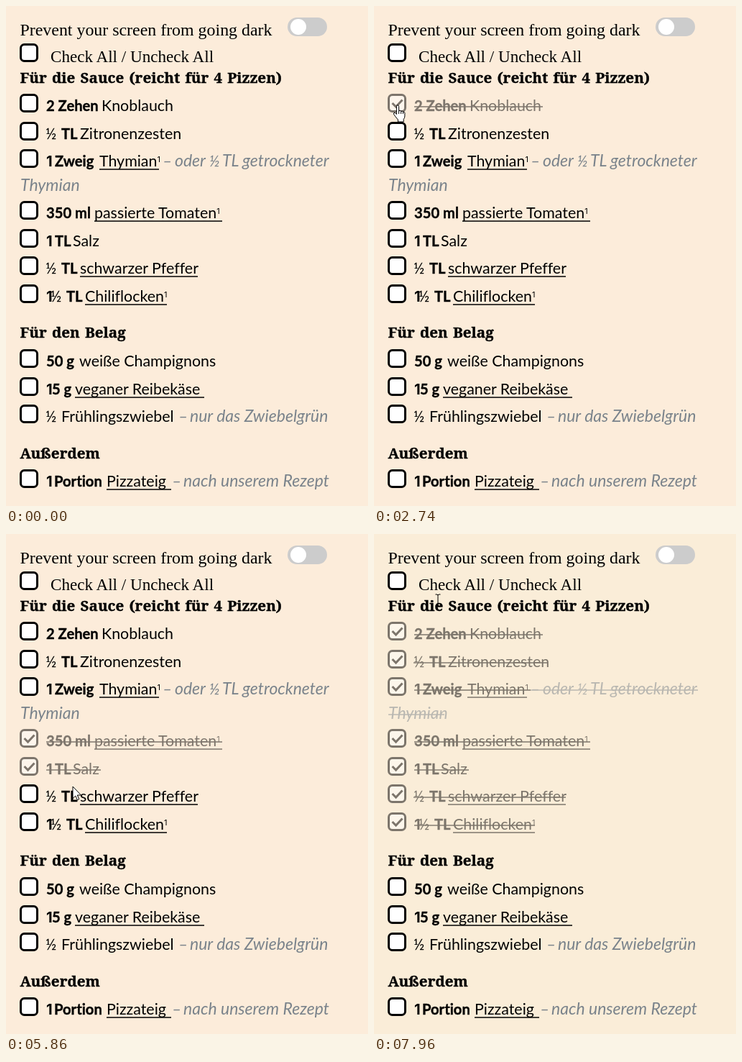
These frames come from a looping animation (504x695 px, 7990 ms). An HTML page:

```html
<!DOCTYPE html>
<html lang="de">
<head>
<meta charset="utf-8">
<title>Zutatenliste</title>
<style>
  html, body { margin: 0; width: 100%; height: 100%; overflow: hidden; background: #fcecda; }
  svg { display: block; width: 504px; height: 695px; }
  text { white-space: pre; font: 21.4px Lato, sans-serif; font-variant-ligatures: none; fill: #000; }
  .b { font-weight: 700; font-size: 20.2px; }
  .one { font: 700 20px Inter, sans-serif; }
  .i { font-style: italic; font-size: 23px; fill: #7a838b; }
  .half { font-size: 21px; }
  .sup { font: 11px Inter, sans-serif; }
  .h { font: 700 20.6px "Noto Serif", serif; word-spacing: 1.8px; }
  .b, .h { stroke: #000; stroke-width: .35; }
  .s { font: 23.9px "Liberation Serif", serif; }
  .s.label { font-size: 23.1px; }
  .line { stroke: #000; stroke-width: 1.4; }
  .line.i { stroke: #7a838b; }
  .box { fill: #fff; stroke: #000; stroke-width: 3; }
  .tick { fill: none; stroke: #000; stroke-width: 3; }
  #cursor path { fill: #fff; stroke: #000; stroke-linejoin: round; }
  #cursor .bare { fill: none; }
</style>
</head>
<body>
<svg viewBox="0 0 504 695">
  <rect x="392" y="16" width="55" height="26" rx="13" fill="#ccc"/>
  <circle cx="407" cy="29" r="11" fill="#fff"/>
  <g id="list"></g>
  <g id="cursor">
    <g id="hand" transform="translate(-6.6 -1)">
      <path d="M5 13.5V2.5a1.6 1.6 0 0 1 3.2 0V8.5q2.8-1 3 .8 2.6-.8 2.8.9 2.4-.5 2.5 1.6V16q0 2.5-1.7 4.5V24H7V21Q3 16.5 1 13.2q-.4-2 1.6-1.8Q4 12 5 13.5Z"/>
      <path class="bare" d="M8.2 8.5V13M11.2 9.3V13M14 10.2V13"/>
    </g>
    <path id="arrow" d="M0 0V16.5L3.8 13 6.3 18.7 8.8 17.6 6.3 12H11.5Z"/>
    <path id="beam" class="bare" d="M-3.5-8H-1L0-7 1-8H3.5M0-7V7M-3.5 8H-1L0 7 1 8H3.5"/>
  </g>
</svg>
<script>
const LOOP = 7990, FADE = 120;
const NS = 'http://www.w3.org/2000/svg';
const $ = id => document.getElementById(id);
const list = $('list');

function add(parent, tag, attrs, text) {
  const el = document.createElementNS(NS, tag);
  for (const key in attrs) el.setAttribute(key, attrs[key]);
  if (text) el.textContent = text;
  return parent.appendChild(el);
}

const line = (parent, x1, x2, y, cls) =>
  add(parent, 'line', { x1, x2, y1: y, y2: y, class: 'line ' + cls });

function write(parent, x, y, cls, text) {
  const raised = text.endsWith('¹');
  const el = add(parent, 'text', { x, y, class: cls }, raised ? text.slice(0, -1) : text);
  if (raised) add(el, 'tspan', { class: 'sup', dy: -6 }, '1');
}

write(list, 19.5, 41, 's', 'Prevent your screen from going dark');
write(list, 62, 78, 's label', 'Check All / Uncheck All');
write(list, 19.5, 107, 'h', 'Für die Sauce (reicht für 4 Pizzen)');
write(list, 19.5, 461, 'h', 'Für den Belag');
write(list, 19.5, 629, 'h', 'Außerdem');

// Each row: box centre, end of text, pieces as [x, class, text, underline end]
const ALL = [1320, 1910];
const rows = [
  { y: 65, end: 0, parts: [], on: [ALL] },
  { y: 135, end: 235, parts: [[56, 'b', '2 Zehen'], [133, 'r', 'Knoblauch']],
    on: [ALL, [2610, 3140], [7600, 9000]] },
  { y: 174, end: 241, parts: [[55, 'half', '½'], [77, 'b', 'TL'], [103, 'r', 'Zitronenzesten']],
    on: [ALL, [7410, 9000]] },
  { y: 212, end: 451, parts: [[56, 'one', '1'], [68, 'b', 'Zweig'], [130, 'r', 'Thymian¹', 213],
      [218, 'i', '–'], [235, 'i', 'oder'], [283, 'i half', '½'], [301, 'i', 'TL'], [329, 'i', 'getrockneter']],
    more: 'Thymian', on: [ALL, [7200, 9000]] },
  { y: 284, end: 301, parts: [[56, 'b', '350 ml'], [123, 'r', 'passierte Tomaten¹', 301]],
    on: [ALL, [5430, 9000]] },
  { y: 323, end: 132, parts: [[56, 'one', '1'], [68, 'b', 'TL'], [93, 'r', 'Salz']],
    on: [ALL, [5680, 9000]] },
  { y: 361, end: 267, parts: [[55, 'half', '½'], [77, 'b', 'TL'], [103, 'r', 'schwarzer Pfeffer', 267]],
    on: [ALL, [6280, 9000]] },
  { y: 400, end: 224, parts: [[56, 'one', '1'], [62, 'half', '½'], [84, 'b', 'TL'], [110, 'r', 'Chiliflocken¹', 224]],
    on: [ALL, [6540, 9000]] },
  { y: 490, end: 296, parts: [[56, 'b', '50 g'], [102, 'r', 'weiße Champignons']], on: [ALL] },
  { y: 529, end: 276, parts: [[56, 'one', '1'], [64, 'b', '5 g'], [96, 'r', 'veganer Reibekäse', 276]],
    on: [ALL] },
  { y: 567, end: 449, parts: [[55, 'half', '½'], [77, 'r', 'Frühlingszwiebel'], [240, 'i', '–'],
      [256, 'i', 'nur das Zwiebelgrün']], on: [ALL] },
  { y: 657, end: 447, parts: [[56, 'one', '1'], [67, 'b', 'Portion'], [140, 'r', 'Pizzateig', 230],
      [231, 'i', '–'], [247, 'i', 'nach unserem Rezept']], on: [ALL] }
];

for (const row of rows) {
  const { y, end, parts } = row, base = y + 11;
  const group = row.group = add(list, 'g', {});
  add(group, 'rect', { x: 20.5, y: y - 11.5, width: 23, height: 23, rx: 5, class: 'box' });
  for (const [x, cls, text, under] of parts) {
    write(group, x, base, cls, text);
    if (under) line(group, x, under, base + 4, '');
  }
  const done = row.done = add(group, 'g', {});
  add(done, 'path', { d: `M25.5 ${y}l5 5 9-9.5`, class: 'tick' });
  parts.forEach(([x, cls], n) => {
    const next = parts[n + 1];
    line(done, x, next ? next[0] : end, base - 6, cls.startsWith('i') ? 'i' : '');
  });
  if (row.more) {
    write(group, 20, base + 34, 'i', row.more);
    line(done, 20, 98, base + 28, 'i');
  }
}

// Cursor path: time, x, y, shape used from that time on
const path = [
  [770, 196, 168, 'arrow'], [930, 120, 112, 'beam'], [1040, 52, 78, 'hand'], [1170, 28, 63, 'hand'],
  [2060, 28, 63, 'hand'], [2220, 31, 98, 'arrow'], [2300, 33, 124, 'hand'], [2400, 33, 138, 'hand'],
  [3260, 33, 138, 'hand'], [3340, 48, 146, 'beam'], [3600, 86, 178, 'beam'],
  [3770, 86, 178, 'arrow'], [4100, 190, 240, 'arrow'], [4560, 250, 310, 'arrow'],
  [4620, 250, 310, 'arrow'], [5040, 143, 339, 'arrow'], [5200, 70, 312, 'hand'], [5380, 33, 286, 'hand'],
  [5480, 33, 286, 'hand'], [5640, 33, 325, 'hand'], [5740, 33, 325, 'arrow'], [5860, 93, 351, 'arrow'],
  [5890, 93, 351, 'arrow'], [6060, 52, 358, 'hand'], [6210, 33, 363, 'hand'],
  [6340, 33, 363, 'hand'], [6500, 33, 402, 'hand'], [6640, 33, 402, 'arrow'],
  [6780, 66, 338, 'arrow'], [6920, 80, 270, 'beam'], [7020, 75, 240, 'beam'],
  [7050, 75, 240, 'hand'], [7160, 33, 215, 'hand'], [7250, 33, 215, 'hand'], [7370, 33, 177, 'hand'],
  [7450, 33, 177, 'hand'], [7560, 33, 138, 'hand'], [7640, 33, 138, 'arrow'], [7780, 87, 94, 'beam'],
  [7959, 87, 94, 'beam'], [7960, 89, 92, 'beam']
];
const tints = [[0, '#fcecda'], [4620, '#feeddb'], [5420, '#fcecda'], [7400, '#faedd8']];

const ramp = (t, from) => Math.min(1, Math.max(0, (t - from) / FADE));
const shapes = ['hand', 'arrow', 'beam'];

function drawCursor(t) {
  const n = path.findLastIndex(p => p[0] <= t);
  $('cursor').style.display = n < 0 ? 'none' : '';
  if (n < 0) return;
  const [t0, x0, y0, shape] = path[n];
  const [t1, x1, y1] = path[n + 1] || [t0 + 1, x0, y0];
  const k = Math.min(1, (t - t0) / (t1 - t0));
  const x = Math.round(x0 + (x1 - x0) * k), y = Math.round(y0 + (y1 - y0) * k);
  $('cursor').setAttribute('transform', `translate(${x} ${y})`);
  for (const id of shapes) $(id).style.display = id === shape ? '' : 'none';
}

function draw(t) {
  for (const { on, group, done } of rows) {
    const k = on.reduce((sum, [start, stop]) => sum + ramp(t, start) - ramp(t, stop), 0);
    group.setAttribute('opacity', 1 - k / 2);
    done.setAttribute('opacity', k);
  }
  document.body.style.background = tints.findLast(s => s[0] <= t)[1];
  drawCursor(t);
}

const start = performance.now();
function tick() {
  draw((performance.now() - start) % LOOP);
  requestAnimationFrame(tick);
}
tick();
</script>
</body>
</html>
```
